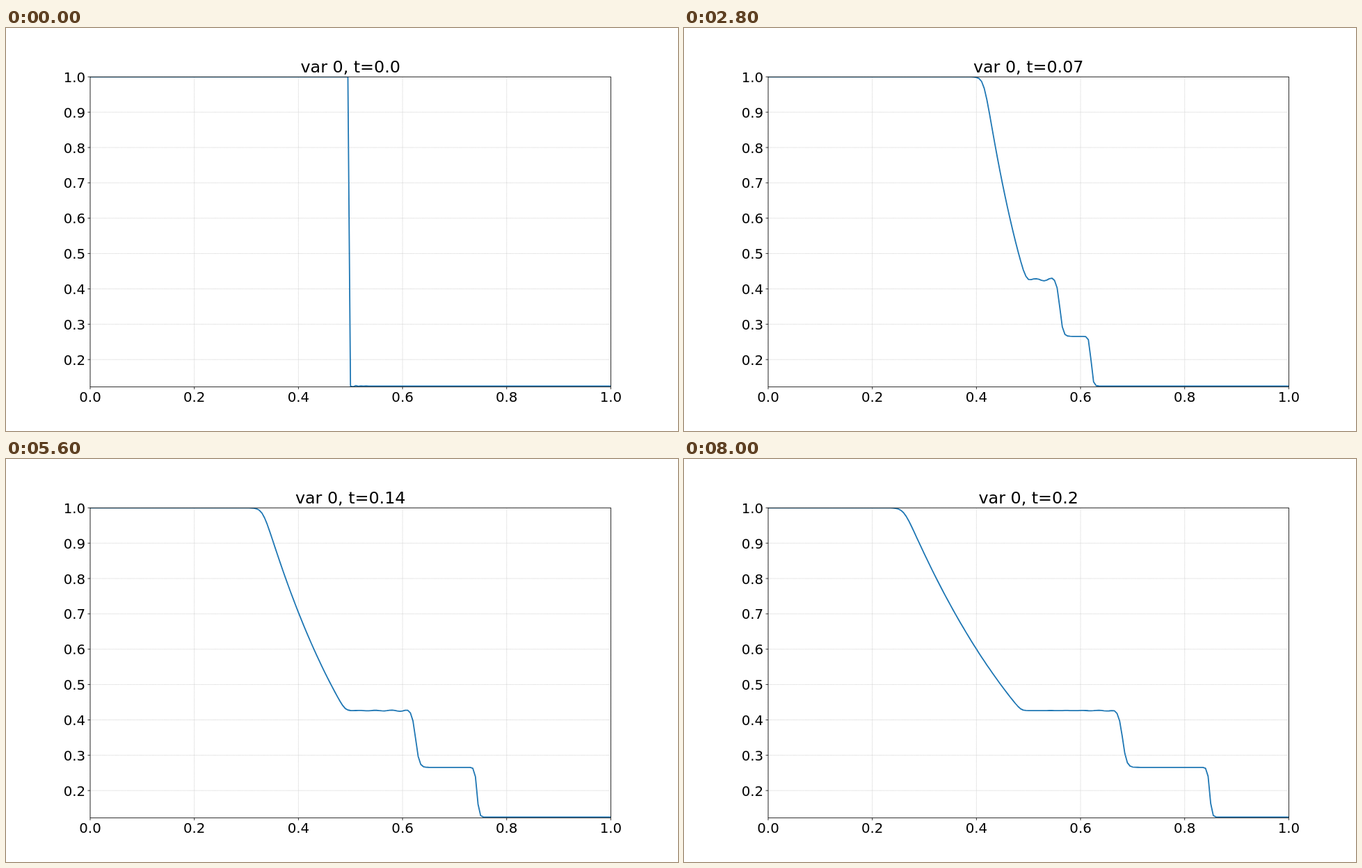
An HTML page for the animation above (8.4 s loop, 966x580 px).

```html
<!DOCTYPE html>
<html lang="en">
<head>
<meta charset="utf-8">
<title>Density profile</title>
<style>
  html, body { margin: 0; width: 100%; height: 100%; overflow: hidden; background: #fff; }
  svg { display: block; }
  text { font: 19.8px "DejaVu Sans", sans-serif; }
  #title { font-size: 23.8px; text-anchor: middle; }
  .grid { stroke: #b0b0b0; stroke-width: .8; stroke-dasharray: .8 1.32; }
  .axis { stroke: #000; stroke-width: .8; fill: none; }
  #curve { stroke: #1f77b4; stroke-width: 1.8; fill: none; stroke-linejoin: round; }
</style>
</head>
<body>
<svg id="plot" width="966" height="580" viewBox="0 0 966 580">
  <clipPath id="area"><rect x="121" y="70.3" width="748.4" height="446.2"/></clipPath>
  <g id="grid"></g>
  <g clip-path="url(#area)"><path id="curve"/></g>
  <g id="axes"><rect class="axis" x="121" y="70.3" width="748.4" height="446.2"/></g>
  <text id="title" x="495.2" y="64.3"></text>
</svg>
<script>
const LEFT = 121, RIGHT = 869.4, TOP = 70.3, BOTTOM = 516.5;
const STEP_MS = 400, STEPS = 21, CELLS = 200;
const byId = id => document.getElementById(id);
const px = x => LEFT + x * (RIGHT - LEFT);
const py = rho => TOP + (1 - rho) * 508.6;

function add(parent, tag, attrs, text = '') {
  const node = document.createElementNS('http://www.w3.org/2000/svg', tag);
  for (const name in attrs) node.setAttribute(name, attrs[name]);
  node.textContent = text;
  byId(parent).append(node);
}

function drawAxes() {
  for (let i = 0; i <= 5; i++) {
    const x = px(i / 5);
    add('grid', 'path', { class: 'grid', d: `M${x} ${BOTTOM}V${TOP}` });
    add('axes', 'path', { class: 'axis', d: `M${x} ${BOTTOM}v3.5` });
    add('axes', 'text', { x, y: 538, 'text-anchor': 'middle' }, (i / 5).toFixed(1));
  }
  for (let i = 2; i <= 10; i++) {
    const y = py(i / 10);
    add('grid', 'path', { class: 'grid', d: `M${LEFT} ${y}H${RIGHT}` });
    add('axes', 'path', { class: 'axis', d: `M${LEFT} ${y}h-3.5` });
    add('axes', 'text', { x: 114.2, y: y + 7.5, 'text-anchor': 'end' }, (i / 10).toFixed(1));
  }
}

// Shock tube: rarefaction fan, contact and shock, each slightly smeared.
const C0 = Math.sqrt(1.4), U_STAR = 0.9274;
const RHO_FAN = 0.4263, RHO_MID = 0.2656, RHO_RIGHT = 0.125;
const softRamp = (d, w) => w * Math.log1p(Math.exp(d / w));
const softDrop = (d, w) => 1 / (1 + Math.exp(d / w));

function initialDensity(x) {
  if (x < 0.4975) return 1;
  const d = x - 0.505;
  return d < -0.001 ? RHO_RIGHT
    : RHO_RIGHT - 0.002 * Math.exp(-d / 0.01) * Math.cos(Math.PI * d / 0.005);
}

function density(x, t) {
  if (t === 0) return initialDensity(x);

  const head = 0.497 - C0 * t, tail = 0.5 - 0.0703 * t;
  const headWidth = 0.0033 * (t / 0.03) ** 0.31;
  const tailWidth = 0.0033 * (1 - Math.exp(-t / 0.04));
  const fan = (softRamp(x - head, headWidth) - softRamp(x - tail, tailWidth)) / (tail - head);
  let rho = (1 - 0.2 * U_STAR * fan / C0) ** 5;

  const d = x - (0.4953 + U_STAR * t);
  rho -= (RHO_FAN - RHO_MID) * (1 - softDrop(d, 0.0025 + 0.0065 * t));
  if (d < -0.00775 && x > 0.499) {
    rho += 0.012 * Math.exp(-8 * t + d / 0.045) * Math.cos(2 * Math.PI * (d + 0.0155) / 0.031);
  }

  const shock = 0.4976 + 1.7522 * t;
  return rho - (RHO_MID - RHO_RIGHT) * (1 - softDrop(x - shock, 0.002));
}

let shown = -1;
function render(now) {
  const step = Math.floor(now / STEP_MS) % STEPS;
  if (step !== shown) {
    shown = step;
    const t = step / 100;
    const points = Array.from({ length: CELLS + 1 }, (_, i) => {
      const x = i / CELLS;
      return `${px(x).toFixed(2)} ${py(density(x, t)).toFixed(2)}`;
    });
    byId('curve').setAttribute('d', 'M' + points.join('L'));
    byId('title').textContent = `var 0, t=${step ? t : '0.0'}`;
  }
}

drawAxes();
const start = performance.now();
function tick() {
  render(performance.now() - start);
  requestAnimationFrame(tick);
}
tick();
</script>
</body>
</html>
```
